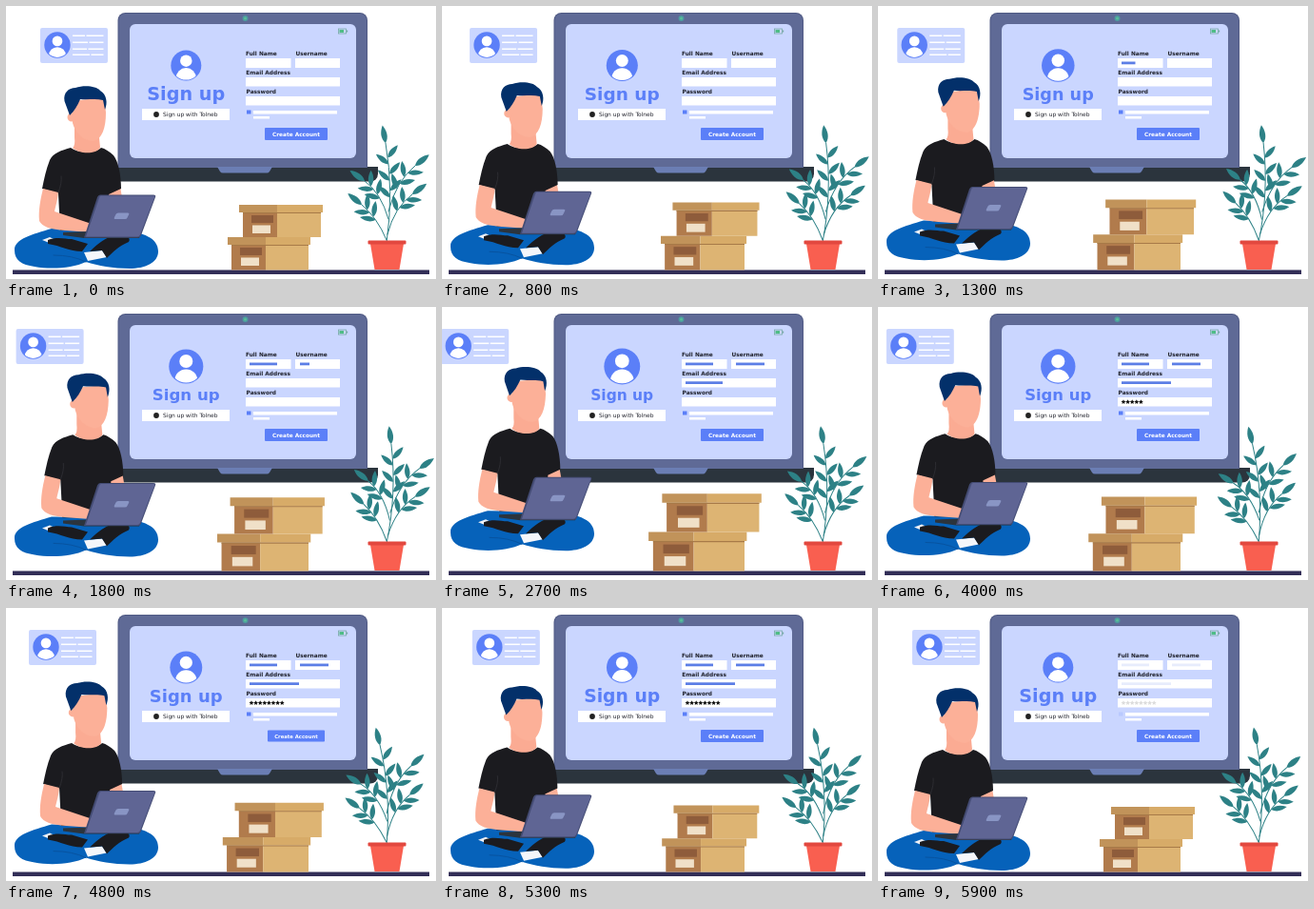
Recreate the animation shown at these times as an HTML page with a canvas. Size 452 by 287 pixels, loop 6 s.

```html
<!DOCTYPE html>
<html lang="en">
<head>
<meta charset="utf-8">
<title>Sign up</title>
<style>
  html, body { margin: 0; width: 100%; height: 100%; overflow: hidden; background: #fff; }
  canvas { display: block; width: 452px; height: 287px; }
</style>
</head>
<body>
<canvas id="stage"></canvas>
<script>
const WIDTH = 452, HEIGHT = 287, LOOP = 6000, STEP = 100;
const FONT = '"DejaVu Sans", sans-serif';
const C = {
  blue: '#5b7ff8', bar: '#5c7ee6', pale: '#cad6ff', slate: '#5f6a96', dark: '#2b343d',
  skin: '#fcb098', hair: '#03306a', shirt: '#1b1b1f', pants: '#0662ba', ink: '#20222c',
  leaf: '#2d8186', ground: '#322e57'
};

const canvas = document.getElementById('stage');
const ctx = canvas.getContext('2d');
const ratio = window.devicePixelRatio || 1;
canvas.width = WIDTH * ratio;
canvas.height = HEIGHT * ratio;

const clamp = v => Math.max(0, Math.min(1, v));
const progress = (t, from, to) => clamp((t - from) / (to - from));

function rect(x, y, w, h, color, radius = 0) {
  ctx.fillStyle = color;
  ctx.beginPath();
  ctx.roundRect(x, y, w, h, radius);
  ctx.fill();
}

function circle(x, y, r, color) {
  ctx.fillStyle = color;
  ctx.beginPath();
  ctx.arc(x, y, r, 0, Math.PI * 2);
  ctx.fill();
}

function shape(d, color) {
  ctx.fillStyle = color;
  ctx.fill(new Path2D(d));
}

function line(d, color, width) {
  ctx.strokeStyle = color;
  ctx.lineWidth = width;
  ctx.lineCap = 'round';
  ctx.stroke(new Path2D(d));
}

function text(str, x, y, size, weight, color, align = 'left') {
  ctx.font = `${weight} ${size}px ${FONT}`;
  ctx.textAlign = align;
  ctx.fillStyle = color;
  ctx.fillText(str, x, y);
}

// Runs draw with its coordinates scaled and rotated about (x, y).
function pivot(x, y, scale, angle, draw) {
  ctx.save();
  ctx.translate(x, y);
  ctx.scale(scale, scale);
  ctx.rotate(angle);
  ctx.translate(-x, -y);
  draw();
  ctx.restore();
}

function avatar(x, y, r) {
  circle(x, y, r, C.blue);
  ctx.save();
  ctx.beginPath();
  ctx.arc(x, y, r * 0.94, 0, Math.PI * 2);
  ctx.clip();
  circle(x, y - r * 0.3, r * 0.39, '#fff');
  ctx.beginPath();
  ctx.ellipse(x, y + r * 0.82, r * 0.66, r * 0.66, 0, 0, Math.PI * 2);
  ctx.fill();
  ctx.restore();
}

function card(x) {
  rect(x, 23, 71, 37, C.pale, 2);
  avatar(x + 18, 41, 13.7);
  [[31, 13], [38, 16], [45, 15], [51, 18]].forEach(([y, w]) => {
    rect(x + 34, y - 0.5, w, 1.5, '#fff');
    rect(x + 35.5 + w, y - 0.5, 31 - w, 1.5, '#fff');
  });
}

function monitor() {
  rect(113, 169, 278, 15.5, C.dark, [0, 0, 8, 8]);
  rect(117.5, 7, 262.5, 163, '#515b85', [8, 8, 0, 0]);
  rect(118.5, 8, 260.5, 162, C.slate, [7, 7, 0, 0]);
  rect(130, 19, 238, 141, C.pale, 6);
  shape('M222 169H280L277 174Q276 175.500 274 175.500H228Q226 175.500 225 174Z', '#6b7eb4');
  circle(251.5, 13, 3, '#4f9aa0');
  circle(251.5, 13, 1.5, '#59bf97');
  ctx.strokeStyle = '#77a9a5';
  ctx.lineWidth = 0.8;
  ctx.strokeRect(349.5, 24, 8, 5);
  rect(350.5, 25, 4.5, 3, '#4fbd86');
  rect(358, 25.5, 1.2, 2, '#77a9a5');
}

function star(x, y) {
  ctx.fillStyle = '#111';
  ctx.beginPath();
  for (let i = 0; i < 10; i++) {
    const a = i * Math.PI / 5 - Math.PI / 2, r = i % 2 ? 1.2 : 2.6;
    ctx.lineTo(x + r * Math.cos(a), y + r * Math.sin(a));
  }
  ctx.fill();
}

function form(t, swing) {
  avatar(189.3, 62.5, 17.5 - 1.5 * swing);
  pivot(189.2, 92, (73 + 8 * swing) / 81, 0, () =>
    text('Sign up', 189.2, 99.3, 19.2, 700, C.blue, 'center'));
  rect(143, 108, 92, 12, '#fff');
  circle(158, 114, 2.9, '#222');
  text('Sign up with Tolneb', 165, 116.1, 5.9, 400, C.ink);

  text('Full Name', 252, 52, 5.85, 700, C.ink);
  text('Username', 304.5, 52, 5.85, 700, C.ink);
  text('Email Address', 252.2, 72.2, 5.85, 700, C.ink);
  text('Password', 252.5, 92.1, 5.85, 700, C.ink);
  rect(252, 55, 47.5, 10, '#fff');
  rect(304, 55, 47, 10, '#fff');
  rect(252, 75, 99, 9.5, '#fff');
  rect(252, 95, 99, 9.5, '#fff');
  rect(260, 110, 88, 3.5, '#fff');
  rect(260, 116, 17, 2.5, '#fff');

  ctx.globalAlpha = 1 - 0.85 * progress(t, 5500, 5900);
  rect(253, 109.5, 4.5, 4, C.blue);
  rect(256, 58.5, 29 * progress(t, 1000, 1600), 2.8, C.bar);
  rect(309, 58.5, 30 * progress(t, 1600, 2200), 2.8, C.bar);
  rect(256, 78.3, 52 * progress(t, 2250, 2850), 2.8, C.bar);
  const stars = Math.max(0, Math.min(8, Math.floor((t - 3000) / 200)));
  for (let i = 0; i < stars; i++) star(258 + i * 4.6, 99.8);
  ctx.globalAlpha = 1;

  const press = Math.sin(Math.PI * progress(t, 4500, 5100));
  pivot(305, 134.5, 1 - 0.09 * press, 0, () => {
    rect(272, 128, 66, 13, C.blue, 1);
    text('Create Account', 305, 136.8, 5.8, 700, '#fff', 'center');
  });
}

function box(x, y, width, height) {
  const split = 40;
  rect(x + 4, y + 8, split - 4, height - 8, '#b17b4c');
  rect(x + split, y + 8, width - split - 2, height - 8, '#ddb473');
  rect(x, y, split, 8, '#c1935a');
  rect(x + split, y, width - split, 8, '#d7ab68');
  rect(x + 4, y + 8, width - 6, 1, '#a77a48');
  rect(x + 13, y + 11, 23, 8, '#8e5c3b');
  rect(x + 14, y + 21.5, 19, 8.5, '#f0e0c8');
}

function boxes(swing) {
  pivot(318, 277.5, 1 + 0.095 * (1 - swing), 0, () => {
    box(233, 243, 87, 34.5);
    box(245, 209, 88, 34);
  });
}

function leaf(x, y, angle, size) {
  ctx.save();
  ctx.translate(x, y);
  ctx.rotate(angle);
  ctx.scale(size, size);
  shape('M0 0C5 -4.300 12 -3.500 18 0C12 3.500 5 4.300 0 0Z', C.leaf);
  ctx.restore();
}

// A curved stem with alternating leaves from the start fraction to its tip.
function stem(x0, y0, cx, cy, x1, y1, pairs, start) {
  line(`M${x0} ${y0}Q${cx} ${cy} ${x1} ${y1}`, C.leaf, 1);
  const point = u => {
    const v = 1 - u;
    return {
      x: v * v * x0 + 2 * v * u * cx + u * u * x1,
      y: v * v * y0 + 2 * v * u * cy + u * u * y1,
      angle: Math.atan2(v * (cy - y0) + u * (y1 - cy), v * (cx - x0) + u * (x1 - cx))
    };
  };
  for (let i = 0; i < pairs; i++) {
    [-1, 1].forEach(side => {
      const p = point(start + (0.95 - start) * (i + (side > 0 ? 0.4 : 0)) / pairs);
      leaf(p.x, p.y, p.angle + side * 0.8, 0.93);
    });
  }
  const tip = point(1);
  leaf(tip.x, tip.y, tip.angle, 1.05);
}

function plant(t) {
  const angle = 0.06 * Math.sin(t / LOOP * Math.PI * 2);
  pivot(400, 248, 1, angle, () => {
    stem(400, 249, 408, 195, 399, 144, 3, 0.45);
    stem(402, 216, 410, 184, 430, 168, 2, 0.42);
    stem(401, 240, 408, 212, 427, 198, 2, 0.5);
    stem(402, 224, 394, 196, 377, 184, 2, 0.45);
    stem(400, 246, 390, 222, 374, 209, 2, 0.5);
  });
  shape('M383 250H418L413.500 277H387.500Z', '#f95f50');
  rect(380.5, 246.5, 40, 4, '#e2483f', 1);
}

function legs() {
  shape('M9 257C8 245 28 240 48 234L120 235C145 238 160 244 160 258C160 270 146 276 130 276C112 276 97 273 84 269C70 276 46 277 30 274C16 272 9 267 9 257Z', C.pants);
  line('M50 262Q70 262 84 269', '#0753a0', 1);
  shape('M38 246L46 243L54 247L48 250Z', '#eef1f6');
  shape('M44 246C54 242 62 245 69 245L86 250L80 258C66 258 58 252 44 250Z', C.shirt);
  shape('M82 259L101 257L106 264L86 268Z', '#f5f6fa');
  shape('M88 258C98 249 104 243 116 241C126 240 132 244 129 248C119 252 112 259 106 265L101 257Z', C.shirt);
}

function head() {
  shape('M69 100L103 96L105 112C105 128 101 140 92 142C82 142 73 134 70 123Z', C.skin);
  circle(69, 117, 4.5, C.skin);
  shape('M67 115L61.500 100C60 91 66 86 73 86C82 83 95 84 99 89C106 93 107 102 104 109L102 99C94 97 86 99 78 98C75 105 72 110 67 115Z', C.hair);
}

function torso(lean) {
  shape('M107 194L120 190L122 201L106 206Z', C.skin);
  shape('M68 149C58 152 50 154 46 162C42 172 40 182 38 192L55 197L57 236L107 236L108 198L121 192C121 178 118 163 113 157C109 153 104 150 100 149C94 155 76 155 68 149Z', C.shirt);
  shape('M39 192L55 196C54 205 52 211 51 216L87 228L90 238L62 236C47 235 38 232 35 226C34 215 36 204 39 192Z', C.skin);
  line('M55 196Q59 186 58 179', '#34343a', 0.7);
  shape('M72 122L97 128L99 149C95 156 77 156 70 149Q73 147 72 138Z', '#fbab93');
  pivot(85, 142, 1, 0.012 * lean, head);
}

function laptop() {
  shape('M60 238L86 237L141 241L140 244H82L60 241Z', C.dark);
  shape('M99 198.500H155Q158 198.500 157 201L142 241Q141 243.500 139 243.500H82L96 201Q97 198.500 99 198.500Z', '#444c74');
  shape('M100 199.500H155Q157 199.500 156 201.500L141 240.500Q140 242.500 138 242.500H84L98 201.500Q98.500 199.500 100 199.500Z', '#5f6594');
  shape('M118 217.500H128Q130 217.500 129 219.500L127.500 222.500Q127 224 125 224H115Q113 224 114 222L115.500 219Q116 217.500 118 217.500Z', '#8995c4');
}

// The whole figure floats; the upper body also leans forward as it rises.
function man(swing) {
  const lean = 1 - swing;
  ctx.save();
  ctx.translate(0, -10 * lean);
  legs();
  ctx.save();
  ctx.translate(1.7 * lean, -0.8 * lean);
  torso(lean);
  ctx.restore();
  laptop();
  ctx.restore();
}

function draw(t) {
  const swing = Math.cos((t + STEP / 2) / LOOP * Math.PI * 2);
  ctx.setTransform(ratio, 0, 0, ratio, 0, 0);
  rect(0, 0, WIDTH, HEIGHT, '#fff');
  card(17.3 + 18.7 * swing);
  monitor();
  form(t, swing);
  rect(7, 277.5, 438, 4.5, C.ground);
  boxes(swing);
  plant(t);
  man(swing);
}

const begin = performance.now();
function tick() {
  const elapsed = performance.now() - begin;
  draw(Math.floor(elapsed / STEP) * STEP % LOOP);
  requestAnimationFrame(tick);
}
tick();
</script>
</body>
</html>
```
